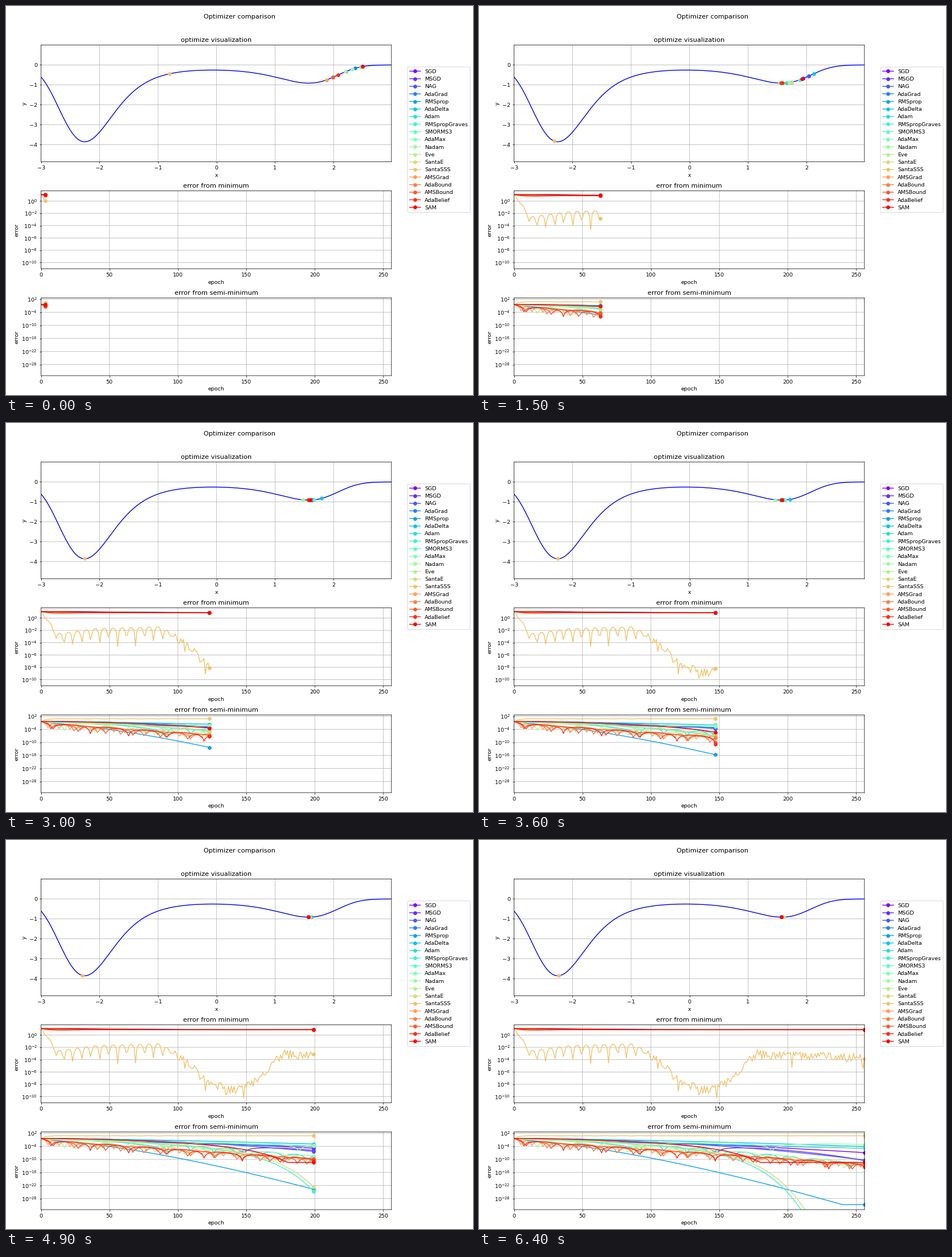
Recreate the animation shown at these times as a matplotlib script. Size 820 by 683 pixels, loop 6500 ms.

```python
import numpy as np
import matplotlib.pyplot as plt
from matplotlib.animation import FuncAnimation

W, H = 820, 683
FRAMES, STEP, LAST = 65, 4, 256
X_MIN, X_SEMI = -2.254, 1.574
plt.rcParams["path.snap"] = False

t = np.arange(LAST + 1)


def f(x):
    return -np.exp(-(x**4 + x**3 - 7 * x**2 - x + 9.5) / 7)


def distance(log_err):
    return np.sqrt(2 * 10.0**log_err)


def descend(drop, power, kick=0, collapse=0, floor=-200, swing=None):
    """Offset from the right-hand minimum at every epoch.

    The log error falls by `drop` decades as a power of time, after a quick
    first `kick`; `collapse` is a late steep fall. `swing` holds the first
    crossing of the minimum and the gap between crossings.
    """
    u = t / LAST
    log_err = -.37 - kick * (1 - np.exp(-t / 5)) - drop * u**power - collapse * u**8
    d = distance(np.maximum(log_err, floor))
    if swing:
        first, gap = swing
        wave = np.cos(np.pi * np.where(t < first, t / first / 2, .5 + (t - first) / gap))
        d = d * np.where(wave < 0, -1, 1) * np.maximum(abs(wave), .02)
    return d


def santa_sss():
    """Falls into the left-hand minimum, swings there, then jitters."""
    rng = np.random.default_rng(4)
    keys = [(0, 1.05), (3, .02), (7, -.9), (10, -2.6), (40, -1.7), (86, -1.4),
            (105, -3.4), (122, -7.3), (143, -8.6), (160, -6.6), (176, -2.6), (256, -3.2)]
    level = np.interp(t, *zip(*keys))
    wave = -np.sin(np.pi * (t - 23.2) / 6.55)
    swing = 2 * np.log10(np.maximum(abs(wave), .03))
    jitter = rng.uniform(-1.3, .2, t.size) - 1.5 * (rng.random(t.size) < .04)
    log_err = level + np.where(t <= 10, 0, np.where(t < 95, swing, jitter))
    side = np.where((t <= 10) | (wave > 0), 1, -1)
    return X_MIN + side * distance(log_err) - X_SEMI


OFFSETS = {
    "SGD": descend(6.5, 1.5),
    "MSGD": descend(9.6, 2.3, swing=(148.4, 130)),
    "NAG": descend(9.9, 2),
    "AdaGrad": descend(4.5, .8),
    "RMSprop": descend(32.8, 1.45, kick=.6, floor=-30.8),
    "AdaDelta": descend(3.7, 1.5),
    "Adam": descend(11.8, 1.5, swing=(92.4, 17)),
    "RMSpropGraves": descend(14, 1.6, collapse=112),
    "SMORMS3": descend(4.5, 1.1),
    "AdaMax": descend(11.6, 1.5, swing=(61.4, 30)),
    "Nadam": descend(2.6, .6, swing=(98.4, 90)),
    "Eve": descend(10.6, 1.1, kick=.5, swing=(17.3, 22)),
    "SantaE": descend(12, 1.5, collapse=105),
    "SantaSSS": santa_sss(),
    "AMSGrad": descend(10.4, 1.05, kick=1, swing=(5.3, 8)),
    "AdaBound": descend(11.2, 1, kick=.8, swing=(7.3, 17)),
    "AMSBound": descend(11, 1, kick=.8, swing=(7.3, 20)),
    "AdaBelief": descend(11.2, 1, kick=.55, swing=(8.4, 27.7)),
    "SAM": descend(10.5, 1.8, collapse=90, floor=-11.4),
}

offsets = list(OFFSETS.values())
paths = [X_SEMI + d for d in offsets]
min_errors = [(x - X_MIN)**2 / 2 for x in paths]
semi_errors = [d**2 / 2 for d in offsets]
colors = plt.cm.rainbow(np.linspace(0, 1, len(OFFSETS)))

fig = plt.figure(figsize=(12, 9.996), dpi=W / 12, facecolor="white")
fig.suptitle("Optimizer comparison")


def panel(top, bottom, title, xlabel, ylabel):
    left, right = 61.6, 676.8
    ax = fig.add_axes([left / W, 1 - bottom / H, (right - left) / W, (bottom - top) / H])
    ax.set_title(title)
    ax.set_xlabel(xlabel)
    ax.set_ylabel(ylabel)
    ax.grid(True)
    return ax


def tracks(ax):
    return [ax.plot([], [], "o-", color=c, label=n)[0] for c, n in zip(colors, OFFSETS)]


def error_panel(top, bottom, title, powers, low, high):
    ax = panel(top, bottom, title, "epoch", "error")
    ax.set_yscale("log")
    ax.set_xlim(0, LAST)
    ax.set_ylim(10.0**low, 10.0**high)
    ax.set_yticks([10.0**p for p in powers])
    ax.minorticks_off()
    return tracks(ax)


ax = panel(68.6, 273.4, "optimize visualization", "x", "y")
xs = np.arange(-3, 3, .01)
ax.plot(xs, f(xs), "b")
ax.set_xlim(-3, 2.99)
ax.set_ylim(f(xs).min() - 1, f(xs).max() + 1)
ax.set_xticks(range(-3, 3))
ax.set_yticks(range(-4, 1))
dots = tracks(ax)

min_lines = error_panel(324.5, 461.3, "error from minimum",
                        range(-10, 1, 2), -11, 1.667)
semi_lines = error_panel(512.7, 649, "error from semi-minimum",
                         range(-28, 3, 6), -33.1, 2.62)

fig.legend(handles=dots, loc="upper left", borderaxespad=0, labelspacing=.451,
           bbox_to_anchor=(705 / W, 1 - 107 / H))


def draw(k):
    n = min(STEP * k + STEP - 1, LAST)
    for dot, x in zip(dots, paths):
        dot.set_data([x[n]], [f(x[n])])
    for line, err in zip(min_lines + semi_lines, min_errors + semi_errors):
        line.set_data(t[:n + 1], err[:n + 1])
        line.set_markevery([n])
    return dots + min_lines + semi_lines


anim = FuncAnimation(fig, draw, frames=FRAMES, interval=100, repeat=True,
                     repeat_delay=0, blit=False)
plt.show()
```
